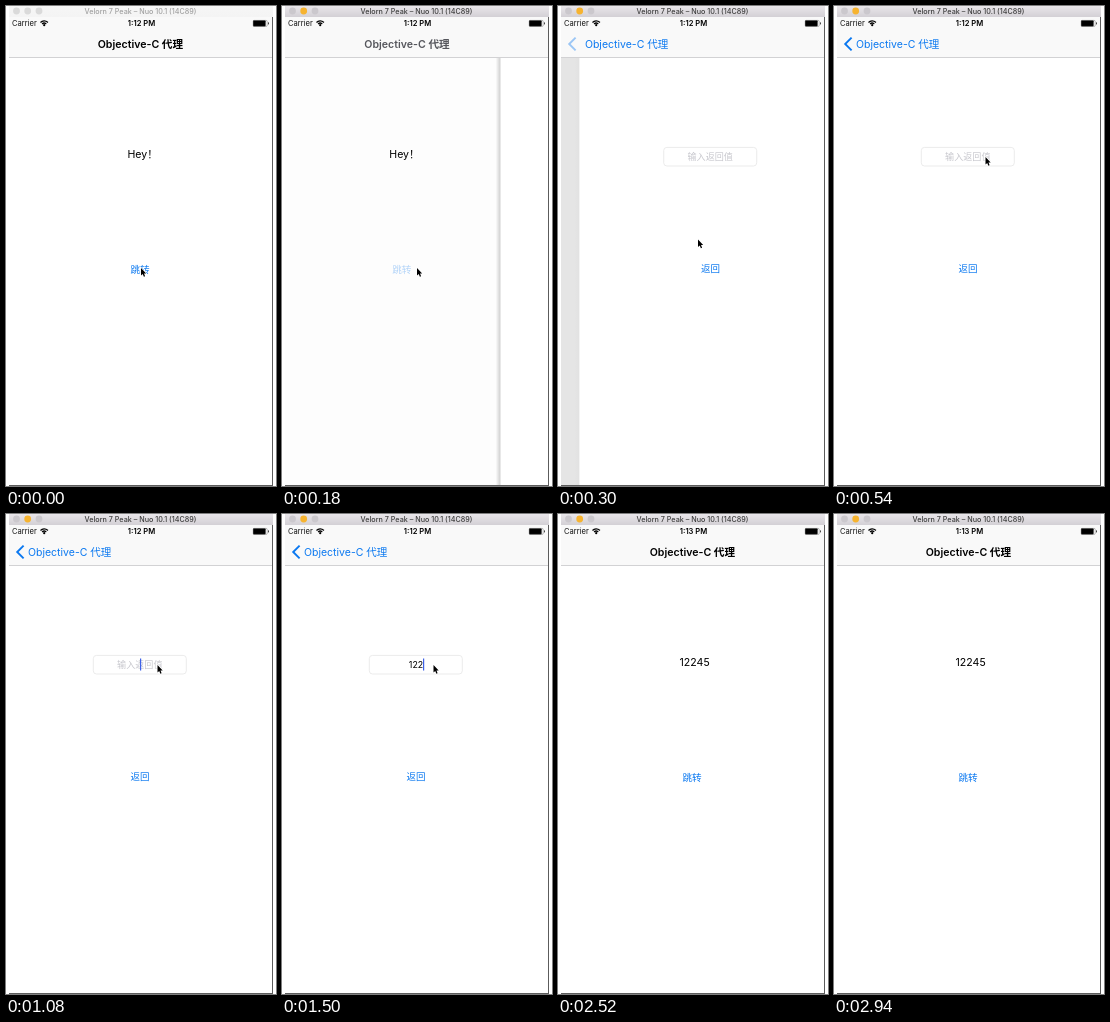
An HTML page with a canvas for the animation above (3000 ms loop, 270x480 px).

```html
<!DOCTYPE html>
<html lang="zh-CN">
<head>
<meta charset="utf-8">
<title>Objective-C 代理</title>
<style>
html, body { margin: 0; width: 100%; height: 100%; overflow: hidden; background: #fff; }
canvas { display: block; width: 270px; height: 480px; }
</style>
</head>
<body>
<canvas id="stage"></canvas>
<script>
const W = 270, H = 480, LOOP = 3000, STEP = 60;
const LEFT = 3, PAGE = 263, NAV = 52;
const BLUE = '#0a78f0';
const POP = 2460;
const FONT = "Inter, 'Noto Sans CJK SC', 'Noto Sans CJK', sans-serif";

const canvas = document.getElementById('stage');
const ctx = canvas.getContext('2d');
const dpr = window.devicePixelRatio || 1;
canvas.width = W * dpr;
canvas.height = H * dpr;

// [time, value, ...] stops with linear motion in between
const slide = [[120, 0], [180, 0.18], [240, 0.68], [300, 0.93], [360, 0.985], [420, 1]];
const pointer = [[180, 135, 262], [300, 140, 233.5], [420, 147, 190], [540, 151.5, 151],
  [1800, 151.5, 151], [1920, 149, 190], [2040, 140, 253]];
const keys = [[1140, '1'], [1260, '12'], [1380, '122'], [1620, '1224'], [1740, '12245']];

function track(stops, t, i = 1) {
  if (t <= stops[0][0]) return stops[0][i];
  for (let k = 1; k < stops.length; k++) {
    const a = stops[k - 1], b = stops[k];
    if (t <= b[0]) return a[i] + (b[i] - a[i]) * (t - a[0]) / (b[0] - a[0]);
  }
  return stops[stops.length - 1][i];
}

function rect(x, y, w, h, color) {
  ctx.fillStyle = color;
  ctx.fillRect(x, y, w, h);
}

function text(str, x, y, size, color, { weight = 400, align = 'left', alpha = 1 } = {}) {
  if (alpha <= 0) return;
  ctx.save();
  ctx.globalAlpha *= alpha;
  ctx.font = `${weight} ${size}px ${FONT}`;
  ctx.textAlign = align;
  ctx.fillStyle = color;
  ctx.fillText(str, x, y);
  ctx.restore();
}

function disc(x, y, r, color) {
  ctx.fillStyle = color;
  ctx.beginPath();
  ctx.arc(x, y, r, 0, Math.PI * 2);
  ctx.fill();
}

function titleBar(active) {
  const g = ctx.createLinearGradient(0, 0, 0, 11);
  g.addColorStop(0, active ? '#e9e6ea' : '#f6f6f6');
  g.addColorStop(1, active ? '#d3d0d5' : '#f4f4f4');
  rect(LEFT, 0, 264, 11, g);
  const gray = active ? '#cbc8cd' : '#dadada';
  disc(10.5, 5, 3.4, gray);
  disc(21.7, 5, 3.4, active ? '#f6b32f' : gray);
  disc(33, 5, 3.4, gray);
  text('Velorn 7 Peak – Nuo 10.1 (14C89)', 134.5, 7.8, 7.2, active ? '#3c3c3c' : '#a0a0a0',
    { weight: 500, align: 'center' });
}

function statusBar(clock) {
  text('Carrier', 6, 20.4, 7.6, '#111');
  text(clock, 135.5, 20.4, 7.6, '#000', { weight: 600, align: 'center' });

  ctx.strokeStyle = '#000';
  ctx.lineWidth = 1.2;
  for (const r of [2.9, 5.1]) {
    ctx.beginPath();
    ctx.arc(38.2, 20, r, -Math.PI * 0.76, -Math.PI * 0.24);
    ctx.stroke();
  }
  disc(38.2, 19.2, 1.1, '#000');

  ctx.fillStyle = '#000';
  ctx.beginPath();
  ctx.roundRect(247, 14.2, 12.6, 6.4, 1);
  ctx.fill();
  ctx.lineWidth = 0.5;
  ctx.strokeStyle = '#777';
  ctx.beginPath();
  ctx.roundRect(247.2, 14.4, 14, 6, 1);
  ctx.stroke();
  rect(262, 16.4, 0.9, 2, '#333');
}

function navBar(p) {
  rect(LEFT, 11, PAGE, NAV - 11, '#f9f9f9');
  rect(LEFT, NAV - 1, PAGE, 1, '#d2d2d4');
  const x = 91.7 - 69.7 * (p < 0.5 ? p * 0.75 : p);
  const title = 'Objective-C 代理';
  const mix = Math.min(1, Math.max(0, (p - 0.3) / 0.5));
  const fade = p > 0 ? '#55565c' : '#000';
  text(title, x, 42, 10.6, fade, { weight: 600, alpha: 1 - mix });
  text(title, x, 42, 10.5, BLUE, { alpha: mix });

  ctx.save();
  ctx.globalAlpha = Math.max(0, p < 1 ? (p - 0.7) * 1.7 : 1);
  ctx.strokeStyle = BLUE;
  ctx.lineWidth = 1.9;
  ctx.beginPath();
  ctx.moveTo(17.6, 31.6);
  ctx.lineTo(11.2, 38);
  ctx.lineTo(17.6, 44.4);
  ctx.stroke();
  ctx.restore();
}

function homePage(dx, label, pressed) {
  rect(LEFT, NAV, PAGE, H - NAV, '#fff');
  text(label, 121.5 + dx, 152, 10.6, '#000');
  text('跳转', 134 + dx, 267, 9.6, BLUE, { align: 'center', alpha: pressed ? 0.3 : 1 });
}

function formPage(dx, value, focused, pressed) {
  rect(LEFT + dx, NAV, PAGE, H - NAV, '#fff');
  ctx.strokeStyle = '#e6e6e6';
  ctx.lineWidth = 0.8;
  ctx.beginPath();
  ctx.roundRect(87.3 + dx, 141.4, 93, 18.6, 3.2);
  ctx.stroke();
  if (value) text(value, 134 + dx, 153.8, 8.8, '#000', { align: 'center' });
  else text('输入返回值', 133.8 + dx, 153.6, 9.1, '#c7c7cd', { align: 'center' });
  if (focused) {
    ctx.font = `400 8.8px ${FONT}`;
    const half = value ? ctx.measureText(value).width / 2 : 0;
    rect(Math.round(133.8 + half), 144.5, 1.2, 12, '#3f62e8');
  }
  text('返回', 134 + dx, 266, 9.5, BLUE, { align: 'center', alpha: pressed ? 0.3 : 1 });
}

function arrow(x, y) {
  const pts = [[0, 0], [0, 7.6], [1.7, 6], [2.9, 8.8], [4.1, 8.3], [3, 5.5], [5.2, 5.4]];
  ctx.beginPath();
  pts.forEach(([a, b]) => ctx.lineTo(x + a, y + b));
  ctx.closePath();
  ctx.lineJoin = 'round';
  ctx.lineWidth = 1.4;
  ctx.strokeStyle = '#fff';
  ctx.stroke();
  ctx.fillStyle = '#000';
  ctx.fill();
  ctx.lineJoin = 'miter';
}

function draw(t) {
  const back = t >= POP;
  const p = back ? 0 : track(slide, t);
  const typed = keys.filter(k => k[0] <= t).pop();
  const value = typed ? typed[1] : '';

  ctx.setTransform(dpr, 0, 0, dpr, 0, 0);
  rect(0, 0, W, H, '#fff');

  ctx.save();
  ctx.beginPath();
  ctx.rect(LEFT, NAV, PAGE, H - NAV);
  ctx.clip();
  if (p < 1) {
    homePage(-79 * p, back ? value : 'Hey！', t >= 60 && t < 300);
    rect(LEFT, NAV, PAGE, H - NAV, `rgba(0,0,0,${0.115 * p ** 1.5})`);
  }
  if (p > 0) {
    const dx = PAGE * (1 - p);
    if (p < 1) {
      const edge = LEFT + dx;
      const g = ctx.createLinearGradient(edge - 5, 0, edge, 0);
      const depth = 0.24 * (1 - p);
      g.addColorStop(0, 'rgba(0,0,0,0)');
      g.addColorStop(1, `rgba(0,0,0,${depth})`);
      rect(edge - 5, NAV, 5, H - NAV, g);
    }
    formPage(dx, value, t >= 660, t >= POP - 120);
  }
  ctx.restore();

  navBar(p);
  statusBar(t < 1740 ? '1:12 PM' : '1:13 PM');
  titleBar(t >= 60);
  rect(266, 11, 1, H - 11, '#5c5c5c');
  rect(LEFT, 479, 264, 1, '#5c5c5c');
  if (!back) arrow(track(pointer, t), track(pointer, t, 2));
}

const start = performance.now();
function tick() {
  const t = (performance.now() - start) % LOOP;
  draw(Math.floor(t / STEP) * STEP);
  requestAnimationFrame(tick);
}
tick();
</script>
</body>
</html>
```
